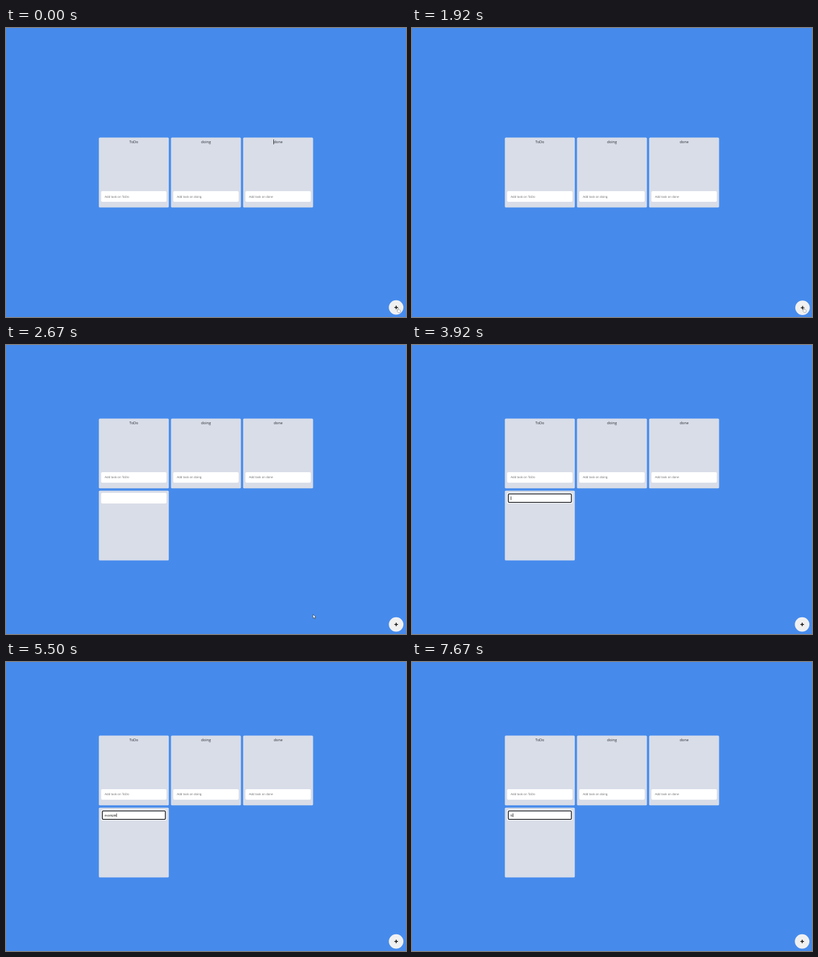
Write an HTML page that moves like this. It is 600x434 px and loops after 8000 ms.

```html
<!DOCTYPE html>
<html lang="en">
<head>
<meta charset="utf-8">
<title>Task board</title>
<style>
  html, body { margin: 0; width: 100%; height: 100%; overflow: hidden; background: #468bec; }
  svg { display: block; width: 100%; height: 100%; }
  text { text-rendering: geometricPrecision; }
  .title { font: 5.6px "Open Sans", sans-serif; fill: #2b2d33; text-anchor: middle; }
  .field { font: 4.65px "Liberation Sans", Arial, sans-serif; fill: #757575; }
  .typed { fill: #111; }
</style>
</head>
<body>
<svg viewBox="0 0 600 434">
  <g id="board"></g>
  <rect id="titleCaret" x="401.2" y="167.3" width=".8" height="7.4" fill="#222"/>

  <g id="newColumn">
    <rect x="139.3" y="218.7" width="104.9" height="104.9" rx="1.6" fill="#d8dde8"/>
    <rect x="142.7" y="222.1" width="98.1" height="15.9" rx="1.7" fill="#fff"/>
    <g id="focus">
      <rect x="144.5" y="223.7" width="94.6" height="12.6" rx="1.3" fill="#fff" stroke="#15181f" stroke-width="1.3"/>
      <text id="typed" class="field typed" x="148" y="231.7"></text>
      <rect id="caret" y="227.4" width=".7" height="5.4" fill="#111"/>
    </g>
  </g>

  <g id="button">
    <circle cx="585.2" cy="419.6" r="10.9" fill="#f0f0f1"/>
    <path d="M582.6 419.6h5.4M585.3 416.9v5.4" stroke="#111" stroke-width="1.3"/>
  </g>
  <path id="hand" fill="#fff" stroke="#777" stroke-width=".5" stroke-linejoin="round"
    d="M587.6 420.6q.6-.6 1.1 0v2.4l2.4.5q.8.3.7 1.1l-.5 2.8h-3l-1.9-2.6q0-.8.7-.6l.5.4z"/>
  <path id="arrow" fill="#fff" stroke="#222" stroke-width=".5" stroke-linejoin="round"
    d="M460.6 404.4v6l1.4-1.2 1 2.3.9-.4-1-2.2h1.9z"/>
</svg>
<script>
const LOOP = 8000;
const PITCH = 108.2;
const $ = id => document.getElementById(id);

$("board").innerHTML = ["ToDo", "doing", "done"].map((name, i) => `
  <g transform="translate(${139.3 + i * PITCH} 164.6)">
    <rect width="104.9" height="104.9" rx="1.6" fill="#d8dde8"/>
    <text class="title" x="52.4" y="8.4">${name}</text>
    <rect x="3.4" y="80.5" width="98.1" height="15.8" rx="1.7" fill="#fff"/>
    <text class="field" x="8.7" y="90">Add task on ${name}</text>
  </g>`).join("");

// [start time, field contents]; "|" marks a visible caret
const typing = [
  [3920, "|"], [4420, ""], [4920, "|"],
  [5000, "exa|"], [5250, "exam|"], [5500, "example|"],
  [5670, "ex|"], [6000, "e|"], [6250, "el|"], [6750, "el"],
  [6830, "ele|"], [7250, "el|"], [7420, "e|"], [7500, "|"], [7670, "E|"]
];

const show = (id, on) => { $(id).style.display = on ? "" : "none"; };
const within = (t, from, to) => t >= from && t < to;

function render(t) {
  const added = t >= 2000;
  $("board").setAttribute("transform", `translate(0 ${added ? -54.2 : 0})`);
  show("titleCaret", t < 500 || within(t, 1080, 1580));
  show("newColumn", added);

  const pressed = within(t, 1920, 2000);
  $("button").setAttribute("transform", pressed ? "translate(.6 .5)" : "");
  show("hand", t < 2670);
  $("hand").setAttribute("transform", t < 1580 ? "" : "translate(-.4 -.3)");
  show("arrow", within(t, 2670, 3670));

  const step = typing.findLast(([start]) => t >= start);
  show("focus", step);
  if (!step) return;
  const text = step[1].replace("|", "");
  $("typed").textContent = text;
  show("caret", step[1].endsWith("|"));
  $("caret").setAttribute("x", 148 + (text ? $("typed").getComputedTextLength() : 0));
}

const begin = performance.now();
function tick() {
  render((performance.now() - begin) % LOOP);
  requestAnimationFrame(tick);
}
tick();
</script>
</body>
</html>
```
